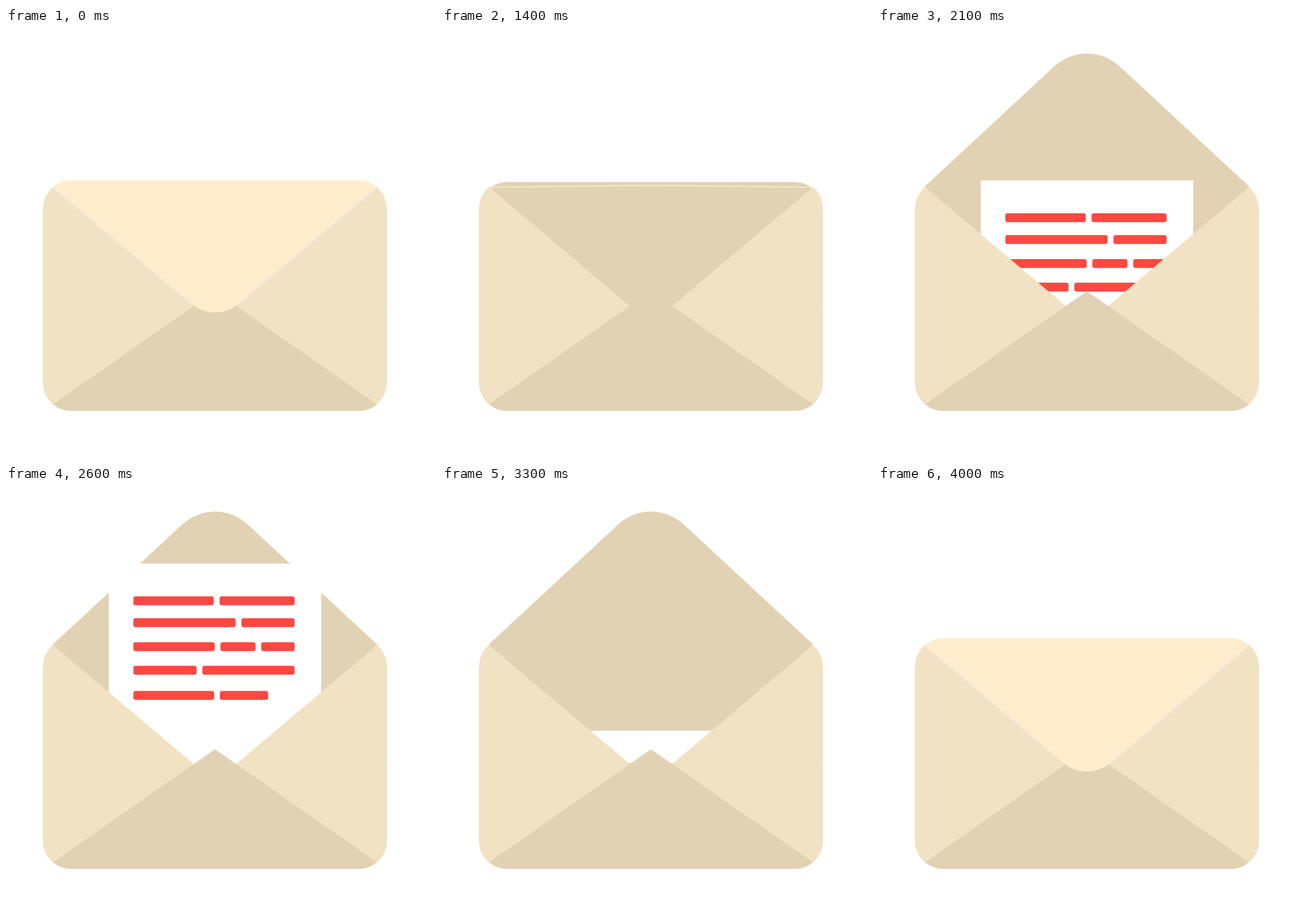
These frames come from a looping animation (748 px wide and 748 px high, 4.1 s). An HTML page with a canvas:

```html
<!DOCTYPE html>
<html lang="en">
<head>
<meta charset="utf-8">
<title>New mail</title>
<style>
  html, body { margin: 0; width: 100%; height: 100%; overflow: hidden; background: #fff; }
  canvas { display: block; width: 748px; height: 748px; }
</style>
</head>
<body>
<canvas id="stage" width="748" height="748"></canvas>
<script>
const ctx = document.getElementById('stage').getContext('2d');
const LOOP = 4100, STEP = 100;
const CREAM = '#feedcd', SIDE = '#f1e2c4', DARK = '#e2d2b4', RED = '#ff4842', EDGE = '#f6e2dc';
const MID = 363.5, HINGE = 277;
const TIP_OPEN = 44.5, TIP_CLOSED = 494.5;

// Letter lines: top, right end, then the centres of the gaps
const LINES = [
  [192, 502, 366.5],
  [230, 502, 404.5],
  [271.7, 502, 368, 439],
  [312.7, 502, 336.5],
  [356.5, 456, 367]
];

const clamp = v => Math.max(0, Math.min(1, v));
const progress = (t, start, length) => clamp((t - start) / length);
const smooth = p => p * p * (3 - 2 * p);

// Step response of a damped spring, 0 to 1 with one overshoot
function spring(ms) {
  if (ms <= 0) return 0;
  const u = ms / 1000, freq = 11.5, damp = 8.05;
  return 1 - Math.exp(-damp * u) * (Math.cos(freq * u) + damp / freq * Math.sin(freq * u));
}

function polygon(color, points) {
  ctx.beginPath();
  points.forEach(([x, y]) => ctx.lineTo(x, y));
  ctx.fillStyle = color;
  ctx.fill();
}

function roundRect(color, x, y, w, h, r) {
  ctx.beginPath();
  ctx.roundRect(x, y, w, h, r);
  ctx.fillStyle = color;
  ctx.fill();
}

function openFlap(tip) {
  ctx.save();
  ctx.translate(MID, HINGE);
  ctx.scale(1, (HINGE - tip) / (HINGE - TIP_OPEN));
  ctx.beginPath();
  ctx.moveTo(-283.5, 0);
  ctx.arcTo(0, -263, 283.5, 0, 84);
  ctx.lineTo(283.5, 0);
  ctx.restore();
  ctx.fillStyle = DARK;
  ctx.fill();
  // Seen edge-on, the light outer face shows as a rim
  if (HINGE - tip < 8) {
    ctx.strokeStyle = CREAM;
    ctx.lineWidth = 1.5;
    ctx.stroke();
  }
}

function closedFlap(tip) {
  const s = (tip - HINGE) / (TIP_CLOSED - HINGE);
  const top = -12 * Math.min(1, 1 / s);
  ctx.save();
  ctx.translate(MID, HINGE);
  ctx.scale(1, s);
  ctx.beginPath();
  for (const dir of [-1, 1]) {
    ctx.moveTo(282 * dir, 0);
    ctx.lineTo(40 * dir, 203.4);
  }
  ctx.strokeStyle = EDGE;
  ctx.lineWidth = 3;
  ctx.stroke();
  ctx.beginPath();
  ctx.moveTo(-282, 0);
  ctx.arcTo(0, 237, 282, 0, 62);
  ctx.lineTo(282, 0);
  ctx.quadraticCurveTo(268.5, top, 249.5, top);
  ctx.lineTo(-249.5, top);
  ctx.quadraticCurveTo(-268.5, top, -282, 0);
  ctx.fillStyle = CREAM;
  ctx.fill();
  ctx.restore();
}

function letter(shift) {
  ctx.save();
  ctx.beginPath();
  ctx.rect(178.5, 0, 370, 490);
  ctx.clip();
  ctx.translate(0, shift);
  ctx.fillStyle = '#fff';
  ctx.fillRect(178.5, 135, 370, 370);
  for (const [top, end, ...gaps] of LINES) {
    let left = 221.5;
    for (const right of [...gaps.map(g => g - 5), end]) {
      roundRect(RED, left, top, right - left, 15.5, 4);
      left = right + 10;
    }
  }
  ctx.restore();
}

function front() {
  ctx.save();
  ctx.beginPath();
  ctx.roundRect(64.5, 265, 598, 401, 49);
  ctx.clip();
  for (const dir of [-1, 1]) {
    const x = d => MID + dir * d;
    polygon(SIDE, [[x(300), 261.5], [x(37), 483.5], [x(37), 485], [x(300), 668]]);
  }
  polygon(DARK, [[MID, 458], [MID + 300, 667.3], [MID - 300, 667.3]]);
  ctx.restore();
}

function badge(size) {
  if (size <= 0) return;
  ctx.save();
  ctx.translate(641.5, 279.5);
  ctx.scale(size, size);
  ctx.beginPath();
  ctx.arc(0, 0, 93.5, 0, Math.PI * 2);
  ctx.fillStyle = RED;
  ctx.fill();
  ctx.fillStyle = '#fff';
  ctx.font = '149px Roboto, "Open Sans", sans-serif';
  ctx.fillText('1', -42.5, 51.5);
  ctx.restore();
}

function draw(t) {
  ctx.fillStyle = '#fff';
  ctx.fillRect(0, 0, 748, 748);

  const opened = smooth(progress(t, 1104, 600)) - spring(t - 3548);
  const tip = TIP_CLOSED + (TIP_OPEN - TIP_CLOSED) * opened;
  const rise = 1 - progress(t, 1825, 690);
  const fall = progress(t, 2634, 741);

  roundRect(DARK, 64.5, 268, 598, 398, 49);
  if (tip < HINGE) openFlap(tip);
  letter(360 * (rise * rise + fall * fall));
  front();
  if (tip >= HINGE) closedFlap(tip);
  badge(smooth(progress(t, 0, 500)) - smooth(progress(t, 626, 500)));
}

const began = performance.now();
function tick() {
  const t = (performance.now() - began) % LOOP;
  draw(Math.floor(t / STEP) * STEP);
  requestAnimationFrame(tick);
}
tick();
</script>
</body>
</html>
```
